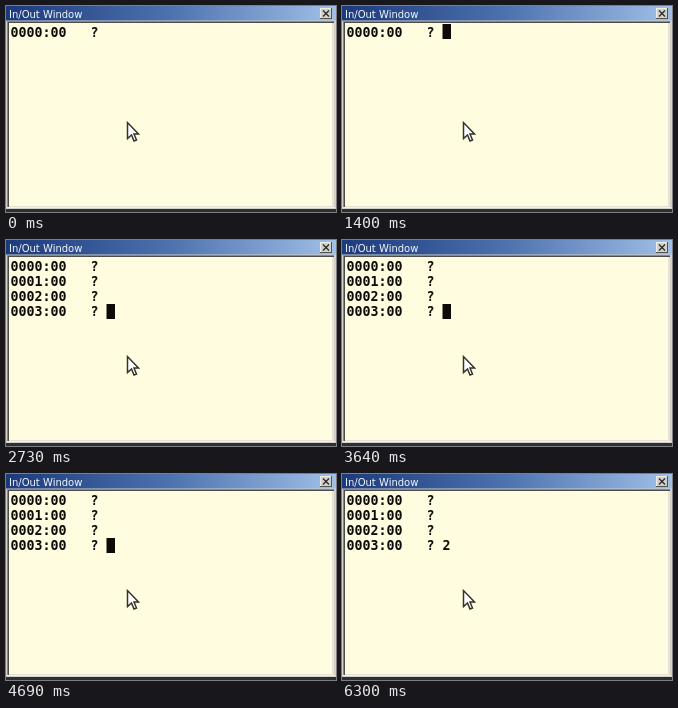
Animation, 330 px wide and 206 px high, one loop 6.37 s. Source, as an HTML page with a canvas:

```html
<!DOCTYPE html>
<html lang="en">
<head>
<meta charset="utf-8">
<title>In/Out Window</title>
<style>
  html, body { margin: 0; width: 100%; height: 100%; overflow: hidden; background: #d4d0c8; }
  canvas { display: block; width: 330px; height: 206px; }
</style>
</head>
<body>
<canvas id="stage" width="330" height="206"></canvas>
<script>
const ctx = document.getElementById('stage').getContext('2d');
const LOOP = 6370;
const PAPER = '#fffcdf', INK = '#0c0b08', FACE = '#d4d0c8';
const CHAR = 8, LINE = 15.2;
const enters = [2030, 2310, 2590];
const digitAt = 6230;
// The caret starts hidden and flips at each of these times.
const blinks = [280, 840, 1330, 1890, 2030, 2800, 3220, 3710, 4270, 4830, 5320, 5880];

const titleFill = ctx.createLinearGradient(0, 0, 330, 0);
titleFill.addColorStop(0, '#1b3a7c');
titleFill.addColorStop(0.5, '#4d72ae');
titleFill.addColorStop(1, '#a0c0e8');

const passed = (times, t) => times.filter(x => x <= t).length;

function box(color, x, y, w, h) {
  ctx.fillStyle = color;
  ctx.fillRect(x, y, w, h);
}

function label(text, x, y, font, color) {
  ctx.font = font;
  ctx.fillStyle = color;
  ctx.fillText(text, x, y);
}

function drawWindow() {
  box(FACE, 0, 0, 330, 206);
  box(titleFill, 0, 0, 330, 14.5);
  label('In/Out Window', 3, 11.7, '10px "DejaVu Sans", sans-serif', '#f4f7fc');

  box('#8a8983', 1, 15, 327, 187);
  box('#4c4c48', 2, 16, 326, 185);
  box('#e6e3d6', 3, 200, 325, 1);
  box('#e6e3d6', 326, 17, 2, 184);
  box(PAPER, 3, 17, 323, 183);
  box('#f3f1ea', 1, 201, 328, 1);
  box('#2c3036', 0, 203, 330, 3);

  box('#55554f', 314, 2, 12, 11);
  box('#f0eee8', 314, 2, 11, 10);
  box(FACE, 315, 3, 10, 9);
  ctx.strokeStyle = '#22262c';
  ctx.lineWidth = 1.2;
  ctx.beginPath();
  ctx.moveTo(317, 4.5); ctx.lineTo(323, 10.5);
  ctx.moveTo(323, 4.5); ctx.lineTo(317, 10.5);
  ctx.stroke();
}

function drawPointer(x, y) {
  const shape = [[0, 0], [0, 16], [4, 12.5], [6.5, 18.5], [9, 17.5], [6.5, 11.5], [11, 11.5]];
  ctx.beginPath();
  shape.forEach(([dx, dy]) => ctx.lineTo(x + dx, y + dy));
  ctx.closePath();
  ctx.fillStyle = '#fff';
  ctx.fill();
  ctx.strokeStyle = '#33322c';
  ctx.lineWidth = 1.5;
  ctx.stroke();
}

function draw(t) {
  drawWindow();
  const last = passed(enters, t);
  for (let i = 0; i <= last; i++) {
    const digit = i === last && t >= digitAt ? ' 2' : '';
    label(`000${i}:00   ?${digit}`, 4.5, 30.5 + i * LINE,
      'bold 13.29px "DejaVu Sans Mono", monospace', INK);
  }
  if (passed(blinks, t) % 2) {
    box(INK, 4.5 + 12 * CHAR, Math.round(18 + last * LINE), CHAR + 0.5, 15);
  }
  drawPointer(121.5, 116.5);
}

function tick(now) {
  draw(now % LOOP);
  requestAnimationFrame(tick);
}
draw(0);
requestAnimationFrame(tick);
</script>
</body>
</html>
```
